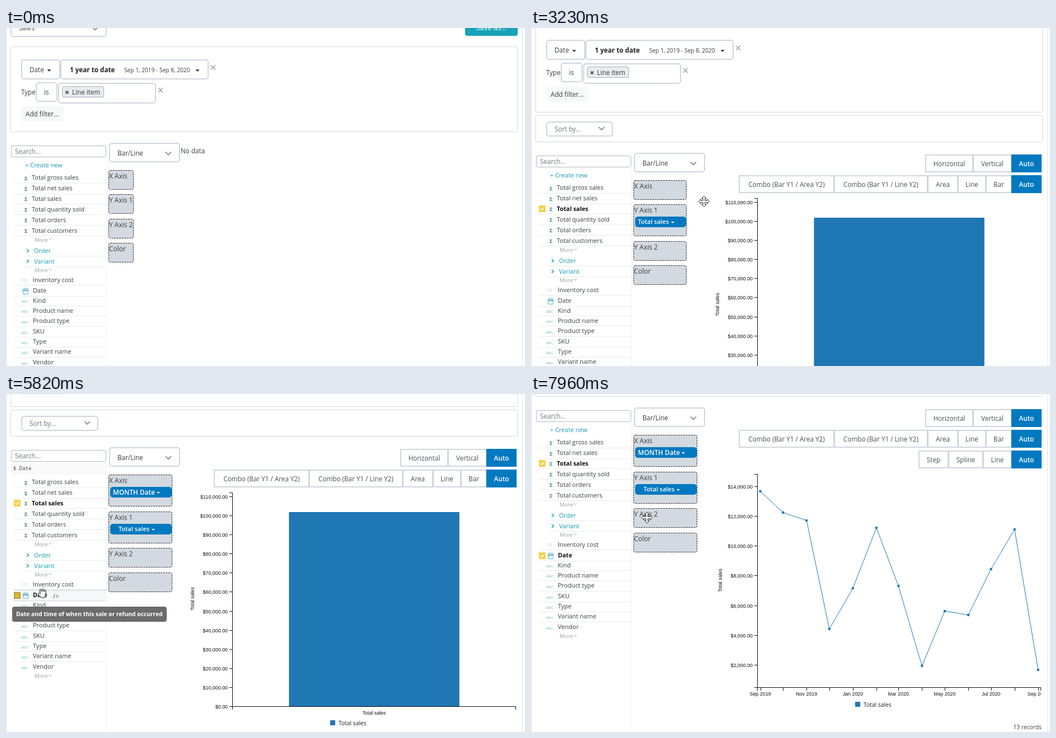
An HTML page with a canvas that plays this animation: 927x604 px, repeating every 7990 ms.

```html
<!DOCTYPE html>
<html lang="en">
<head>
<meta charset="utf-8">
<title>Report builder</title>
<style>
html, body { margin: 0; width: 100%; height: 100%; overflow: hidden; background: #fff; }
canvas { display: block; }
</style>
</head>
<body>
<canvas id="stage" width="927" height="604"></canvas>
<script>
const ctx = document.getElementById('stage').getContext('2d');
const LOOP = 7990;
const UI = '"Open Sans", "Noto Sans", sans-serif';
const ARIAL = '"Liberation Sans", Arial, sans-serif';
const MONO = '"Noto Sans Mono", "Liberation Mono", monospace';
const SERIF = '"Liberation Serif", serif';
const BLUE = '#0079c0', TEAL = '#1799b5', EDGE = '#cfd6de', CHART = '#1f77b4', INK = '#3a3d40';

// Moments of the hard changes
const PICK_SALES = 2030, BAR_SHOWN = 2860, PICK_DATE = 5280, LINE_SHOWN = 6630;

// time, x, y of the mouse
const PATH = [
  [60, 817, 593], [350, 560, 440], [850, 150, 300], [880, 150, 300], [1380, 95, 322],
  [1620, 95, 322], [1810, 84, 307], [2250, 84, 307], [2550, 300, 300], [2860, 300, 300],
  [3060, 309, 310], [3890, 309, 310], [4300, 150, 345], [4560, 79, 359], [4730, 79, 359],
  [4890, 65, 356], [5880, 65, 356], [6050, 366, 388], [6150, 399, 340], [6330, 335, 264],
  [7630, 335, 264], [7960, 207, 221]
];

// label, offset below the top of the list, icon
const FIELDS = [
  ['Total gross sales', 47.5, 'sum'], ['Total net sales', 66.5, 'sum'], ['Total sales', 85, 'sum'],
  ['Total quantity sold', 104, 'sum'], ['Total orders', 123, 'sum'], ['Total customers', 142, 'sum'],
  ['Inventory cost', 230, '123'], ['Date', 249.5, 'date'], ['Kind', 267, 'abc'],
  ['Product name', 285, 'abc'], ['Product type', 303.5, 'abc'], ['SKU', 322.5, 'abc'],
  ['Type', 340.5, 'abc'], ['Variant name', 358.5, 'abc'], ['Vendor', 377.5, 'abc']
];
const MONTHLY = [13.66, 12.23, 11.7, 4.41, 7.15, 11.21, 7.3, 1.93, 5.61, 5.35, 8.43, 11.1, 1.66];

const clamp = v => Math.max(0, Math.min(1, v));
const smooth = v => v * v * (3 - 2 * v);
const span = (t, a, b) => clamp((t - a) / (b - a));

function text(s, x, y, size = 11.7, color = INK, o = {}) {
  ctx.font = `${o.style || ''} ${o.weight || 400} ${size}px ${o.font || UI}`;
  ctx.textAlign = o.align || 'left';
  ctx.fillStyle = color;
  ctx.fillText(s, x, y + size * 0.35);
}

function fill(x, y, w, h, color, r = 0) {
  ctx.fillStyle = color;
  ctx.beginPath();
  ctx.roundRect(x, y, w, h, r);
  ctx.fill();
}

// Border drawn inside the box
function frame(x, y, w, h, color = EDGE, line = 1, r = 2) {
  ctx.strokeStyle = color;
  ctx.lineWidth = line;
  ctx.beginPath();
  ctx.roundRect(x + line / 2, y + line / 2, w - line, h - line, r);
  ctx.stroke();
}

function poly(points, color, line = 1) {
  ctx.strokeStyle = color;
  ctx.lineWidth = line;
  ctx.beginPath();
  points.forEach(([x, y]) => ctx.lineTo(x, y));
  ctx.stroke();
}

const chevron = (x, y, r = 5, color = '#6c757d', line = 1.5) =>
  poly([[x - r, y - r / 2], [x, y + r / 2], [x + r, y - r / 2]], color, line);

function caret(x, y, color, r = 3.5) {
  ctx.fillStyle = color;
  ctx.beginPath();
  ctx.moveTo(x - r, y - r / 2);
  ctx.lineTo(x + r, y - r / 2);
  ctx.lineTo(x, y + r / 2);
  ctx.fill();
}

function cross(x, y, r, color, line) {
  poly([[x - r, y - r], [x + r, y + r]], color, line);
  poly([[x - r, y + r], [x + r, y - r]], color, line);
}

function scrollAt(t) {
  const a = 1 - (1 - span(t, 3190, 3550)) ** 2;
  return Math.round(163 * a + 71 * smooth(span(t, 6958, 7170)));
}

function mouseAt(t) {
  const i = PATH.findIndex(p => p[0] > t);
  if (i === 0) return null;
  if (i < 0) return PATH[PATH.length - 1].slice(1);
  const [a, b] = [PATH[i - 1], PATH[i]];
  const k = span(t, a[0], b[0]);
  return [a[1] + (b[1] - a[1]) * k, a[2] + (b[2] - a[2]) * k];
}

function hoveredField(t, mouse, top) {
  if (t >= PICK_SALES && t < 2260) return 'Total sales';
  if (!mouse || mouse[0] > 179 || mouse[0] < 10) return null;
  const f = FIELDS.find(f => Math.abs(mouse[1] - top - f[1]) < 9.5);
  return f ? f[0] : null;
}

function drawFilters(y) {
  frame(8, y - 30, 172, 46, EDGE, 2, 4);
  text('Sales', 23, y);
  chevron(159, y + 1);
  fill(820, y - 25, 94, 39, '#17a2b8', 4);
  text('Save as...', 867, y - 1, 13, '#fff', { align: 'center' });

  frame(8, y + 33, 906, 153, '#d3d7db');
  frame(27, y + 56, 70, 36, EDGE, 2, 4);
  text('Date', 42, y + 75);
  caret(77, y + 76, '#222');
  frame(97, y + 56, 265, 36, EDGE, 2, 4);
  text('1 year to date', 114, y + 75, 11.7, '#222', { weight: 700 });
  text('Sep 1, 2019 - Sep 8, 2020', 211, y + 75.5, 10.2);
  caret(342, y + 76, '#222');
  cross(370, y + 70.5, 4, '#999', 1.2);

  text('Type', 27, y + 115);
  frame(53, y + 97, 39, 35, EDGE, 2, 4);
  text('is', 68, y + 115);
  frame(93, y + 98, 175, 37, EDGE, 2, 4);
  fill(100, y + 104, 75, 20, '#e9ecef', 3);
  frame(100, y + 104, 75, 20, '#a9adb1', 1, 3);
  cross(109, y + 115, 2.5, '#555', 1.8);
  text('Line item', 118, y + 114.5);
  cross(276, y + 111, 4, '#999', 1.2);

  fill(27, y + 140, 76, 27, '#f7f8f9', 3);
  text('Add filter...', 35, y + 154);
}

function drawSort(y, wide) {
  frame(8, y + 191, 906, 48, '#d3d7db');
  const w = wide ? 138 : 119;
  frame(27, y + 202, w, 27, EDGE, 2, 4);
  text('Sort by...', 42, y + 216, 11.7, '#6c757d');
  chevron(7 + w, y + 214.5);
}

function fieldIcon(kind, y) {
  if (kind === 'sum') text('Σ', 33, y + 0.5, 9, '#32857a', { weight: 700 });
  else if (kind === 'date') {
    frame(30, y - 4, 10, 10, '#55b2c4', 1, 1.5);
    fill(30, y - 2, 10, 2, '#55b2c4');
    fill(32, y - 6, 1, 3, '#55b2c4');
    fill(37, y - 6, 1, 3, '#55b2c4');
  } else text(kind, 27, y + 1, kind === 'abc' ? 7.6 : 6.2, kind === 'abc' ? '#6fbccb' : '#a5cdd8');
}

function drawCheck(y, hover, amount) {
  if (hover) {
    ctx.globalAlpha = amount;
    fill(14, y - 6, 12, 12, '#dcb83c', 1);
    ctx.globalAlpha = 1;
    frame(14, y - 6, 12, 12, amount > 0.5 ? '#a98f35' : '#444', 1.5, 1);
  } else {
    fill(14, y - 6, 12, 12, '#f6cf45', 1);
    poly([[16.5, y], [19, y + 2.5], [23.5, y - 2.5]], '#fff', 1.5);
  }
}

function drawField([name, dy, kind], top, t, hovered) {
  const y = top + dy, hover = name === hovered;
  const picked = { 'Total sales': PICK_SALES, Date: PICK_DATE }[name];
  const on = t >= picked;
  const line = Math.round(y + 9);
  if (hover) {
    fill(14, line - 19, 165, 19, '#f5f7f8');
    fill(14, line - 19, 165, 1, '#cfdae4');
  }
  if (name !== 'Vendor' || hover) fill(14, line, 165, 1, hover ? '#cfdae4' : '#e9ebed');
  if (hover && on) {
    ctx.globalAlpha = 1 - span(t, picked + 150, picked + 450);
    fill(26, line - 18, 15, 18, '#fbf3d2');
    ctx.globalAlpha = 1;
  }
  if (hover || on) drawCheck(Math.round(y), hover, on ? span(t, picked + 150, picked + 450) : 0);
  fieldIcon(kind, Math.round(y));
  const x = kind === 'sum' ? 46 : 48;
  text(name, x, y, on ? 10.8 : 11, on ? '#111' : INK, { weight: on ? 700 : 400 });
  if (!hover) return;
  const end = x + ctx.measureText(name).width;
  text('ƒx', end + 10, y + 1, 11, '#666', { style: 'italic', font: SERIF });
  if (kind === 'sum') {
    frame(167, y - 6, 8, 8, '#555', 1, 0);
    fill(170, y - 3, 8, 8, '#fff');
    frame(170, y - 3, 8, 8, '#555', 1, 0);
  }
}

function more(y) {
  text('More', 51, y, 9.7, '#9a9da0');
  chevron(79, y - 1, 2.5, '#9a9da0', 1);
}

function drawList(top, t, hovered) {
  fill(179, top + 12, 1, 604, '#f2f3f4');
  const focus = t >= PICK_SALES && t < 2400;
  frame(9, top - 10, 170, 21, focus ? '#7fb2e0' : '#b4b8bc', 1, 2);
  text('Search...', 16, top + 0.5, 11.7, '#74787c');

  if (hovered) {
    fill(9, top + 14, 170, 18, '#fafafa');
    fill(9, top + 32, 170, 1, '#eef0f1');
    text('$.' + hovered.replace(/ (.)/g, (m, c) => c.toUpperCase()), 13, top + 23, 9, '#444', { font: MONO });
  } else text('+ Create new', 34, top + 25, 11, TEAL);

  FIELDS.forEach(f => drawField(f, top, t, null));
  FIELDS.filter(f => f[0] === hovered).forEach(f => drawField(f, top, t, hovered));

  more(top + 158.5);
  [['Order', 178], ['Variant', 197]].forEach(([name, dy]) => {
    const y = top + dy;
    poly([[37, y - 3], [40.5, y], [37, y + 3]], TEAL, 1.4);
    text(name, 50, y, 11, TEAL);
    fill(30, y + 9, 149, 1, '#e9ebed');
  });
  more(top + 212.5);
  more(top + 394);
}

function drawShelves(base, t) {
  frame(184, base - 16, 127, 35, EDGE, 2, 4);
  text('Bar/Line', 199, base + 2.5);
  chevron(290, base + 3);
  if (t < BAR_SHOWN) text('No data', 312, base - 1);

  const sales = t >= PICK_SALES, date = t >= PICK_DATE;
  const w = date ? 114 : sales ? 95 : 45;
  let top = base + 33;
  [['X Axis', date && 'MONTH Date'], ['Y Axis 1', sales && 'Total sales'], ['Y Axis 2'], ['Color']].forEach(([name, pill]) => {
    const y = Math.round(top), h = pill ? 57 : 35;
    fill(183, y, w, h, '#d2d9e0', 3);
    ctx.setLineDash([3, 1.5]);
    frame(183, y, w, h, '#333', 1, 3);
    ctx.setLineDash([]);
    text(name, 184, y + 11, 12);
    if (pill) {
      const isDate = pill === 'MONTH Date';
      const x = isDate || !date ? 191 : 201;
      fill(186, y + 22, w - 4, 19, BLUE, 5);
      text(pill, x, y + 31.5, isDate ? 11.8 : 11, '#fff', { weight: 600 });
      caret(x + (isDate ? 81 : 62), y + 32.5, '#fff', 3);
    }
    top += pill ? 65.6 : 43.3;
  });
}

// Labels with the left edges of their buttons; the group ends at x = 912
function buttons(y, items) {
  items.forEach(([label, x], i) => {
    const last = i === items.length - 1;
    const end = last ? 912 : items[i + 1][1] + 1;
    if (last) fill(x, y, end - x, 32, BLUE);
    else frame(x, y, end - x, 32, EDGE, 2, 0);
    text(label, (x + end) / 2, y + 16.5, 11.7, last ? '#fff' : '#495057', { align: 'center', weight: last ? 600 : 400 });
  });
}

function axes(top, bottom) {
  poly([[399, top + .5], [404.5, top + .5], [404.5, bottom + .5], [399, bottom + .5]], '#111');
  poly([[404.5, bottom + 6], [404.5, bottom + .5], [910.5, bottom + .5], [910.5, bottom + 6]], '#111');
}

function yTick(y, value) {
  const p = Math.round(y) + .5;
  poly([[399, p], [404, p]], '#111');
  const label = '$' + value.toLocaleString('en-US', { minimumFractionDigits: 2 });
  text(label, 396, p + .5, 8.9, '#111', { font: ARIAL, align: 'right' });
}

function yTitle(x, y) {
  ctx.save();
  ctx.translate(x, y);
  ctx.rotate(-Math.PI / 2);
  text('Total sales', 0, 0, 8.8, '#111', { font: ARIAL, align: 'center' });
  ctx.restore();
}

function legend(y) {
  fill(579, y - 5, 9, 9, CHART);
  text('Total sales', 594, y, 10.3, '#222');
}

function drawBar(base) {
  const bottom = base + 447;
  fill(505.4, base + 100, 304.4, 347, CHART);
  axes(base + 65, bottom);
  for (let i = 0; i <= 11; i++) yTick(bottom - i * 34.1, i * 10000);
  text('Total sales', 657.5, base + 459, 8.8, '#111', { font: ARIAL, align: 'center' });
  yTitle(332.5, base + 255);
  legend(base + 477);
}

function drawLine(base) {
  const bottom = base + 484;
  const yOf = v => base + 444 - (v - 2) * 26.6;
  axes(base + 103, bottom);
  for (let v = 2; v <= 14; v += 2) yTick(yOf(v), v * 1000);
  const start = Date.UTC(2019, 8, 1);
  const points = MONTHLY.map((v, i) => [409.5 + (Date.UTC(2019, 8 + i, 1) - start) / 864e5 * 1.356, yOf(v)]);
  poly(points, CHART, 1);
  ctx.save();
  ctx.beginPath();
  ctx.rect(0, 0, 911, 604);
  ctx.clip();
  points.forEach(([x, y], i) => {
    ctx.fillStyle = CHART;
    ctx.beginPath();
    ctx.arc(x, y, 2.3, 0, 7);
    ctx.fill();
    const p = Math.round(x) + .5;
    poly([[p, bottom], [p, bottom + 6]], '#111');
    if (i % 2) return;
    const day = new Date(Date.UTC(2019, 8 + i, 1));
    const month = 'Jan Feb Mar Apr May Jun Jul Aug Sep Oct Nov Dec'.split(' ')[day.getUTCMonth()];
    text(`${month} ${day.getUTCFullYear()}`, x, base + 496, 8.9, '#111', { font: ARIAL, align: 'center' });
  });
  ctx.restore();
  yTitle(338, base + 293);
  legend(base + 515);
  text('13 records', 912, base + 555, 10.3, INK, { align: 'right' });
}

function drawChart(base, t) {
  if (t < BAR_SHOWN) return;
  buttons(base - 13, [['Horizontal', 704], ['Vertical', 789], ['Auto', 858]]);
  buttons(base + 24, [['Combo (Bar Y1 / Area Y2)', 371], ['Combo (Bar Y1 / Line Y2)', 541], ['Area', 708],
    ['Line', 762], ['Bar', 812], ['Auto', 858]]);
  if (t < LINE_SHOWN) return drawBar(base);
  buttons(base + 61, [['Step', 692], ['Spline', 745], ['Line', 807], ['Auto', 858]]);
  drawLine(base);
}

function drawTooltip(t) {
  ctx.globalAlpha = span(t, 5480, 5600) * (1 - span(t, 5920, 6040));
  fill(11, 380, 276, 27, '#6b6b6b', 4);
  text('Date and time of when this sale or refund occurred', 18, 393.5, 10.3, '#fff', { weight: 700 });
  ctx.globalAlpha = 1;
}

const POINTER = new Path2D('M-1.5 1.5Q-1.5 0 0 0Q1.5 0 1.5 1.5V7Q1.5 6 3 6Q4.5 6 4.5 7.5Q4.5 6.7 6 6.7Q7.5 6.7 7.5 8.3' +
  'Q7.5 7.6 8.8 7.6Q10 7.8 10 9.3V13Q10 15 8.5 17V20H.5V18Q-4 13 -5 11Q-5.5 9 -3.5 9.3L-1.5 11Z');
const GRAB = new Path2D('M-3.5 1L-5 -5Q-5.3 -6.5 -4 -6.5Q-3 -6.5 -2.3 -4.5L-1.8 -3V-6.5Q-1.8 -8 -.5 -8Q.7 -8 .7 -6.5V-3' +
  'L1.2 -6Q1.5 -7.3 2.6 -7.2Q3.8 -7 3.6 -5.5L3.3 -2.5L4.5 -4.5Q5.2 -5.6 6.2 -5Q7 -4.5 6.6 -3Q5.5 2 5 4L4 8H-2' +
  'Q-5 4 -7.5 1.5Q-8 0 -6.5 -.2Q-5 -.2 -3.5 1Z');
const MOVE = new Path2D();
[0, 1, 2, 3].forEach(q => {
  [[-1.8, -1.8], [-1.8, -5.5], [-4, -5.5], [0, -9.8], [4, -5.5], [1.8, -5.5]].forEach(([x, y]) => {
    for (let i = 0; i < q; i++) [x, y] = [-y, x];
    MOVE.lineTo(x, y);
  });
});
MOVE.closePath();

function drawMouse(t, [x, y]) {
  const shape = x > 181 ? MOVE : t > 4200 && t < 5095 ? POINTER : GRAB;
  ctx.save();
  ctx.translate(Math.round(x), Math.round(y));
  ctx.fillStyle = '#fff';
  ctx.strokeStyle = '#222';
  ctx.lineWidth = 1;
  ctx.lineJoin = 'round';
  ctx.fill(shape);
  ctx.stroke(shape);
  ctx.restore();
}

function draw(t) {
  const scroll = scrollAt(t);
  const base = (t < PICK_SALES ? 221 : 274) - scroll;
  const listTop = base - 1;
  const mouse = mouseAt(t);
  fill(0, 0, 927, 604, '#fff');
  fill(0, 0, 1, 604, '#dfe2e5');
  fill(922, 0, 1, 604, '#e2e4e7');
  drawFilters(-scroll);
  if (t >= PICK_SALES) drawSort(-scroll, t >= PICK_DATE);
  drawList(listTop, t, hoveredField(t, mouse, listTop));
  drawShelves(base, t);
  drawChart(base, t);
  drawTooltip(t);
  if (mouse) drawMouse(t, mouse);
}

const began = performance.now();
function tick() {
  draw((performance.now() - began) % LOOP);
  requestAnimationFrame(tick);
}
tick();
</script>
</body>
</html>
```
